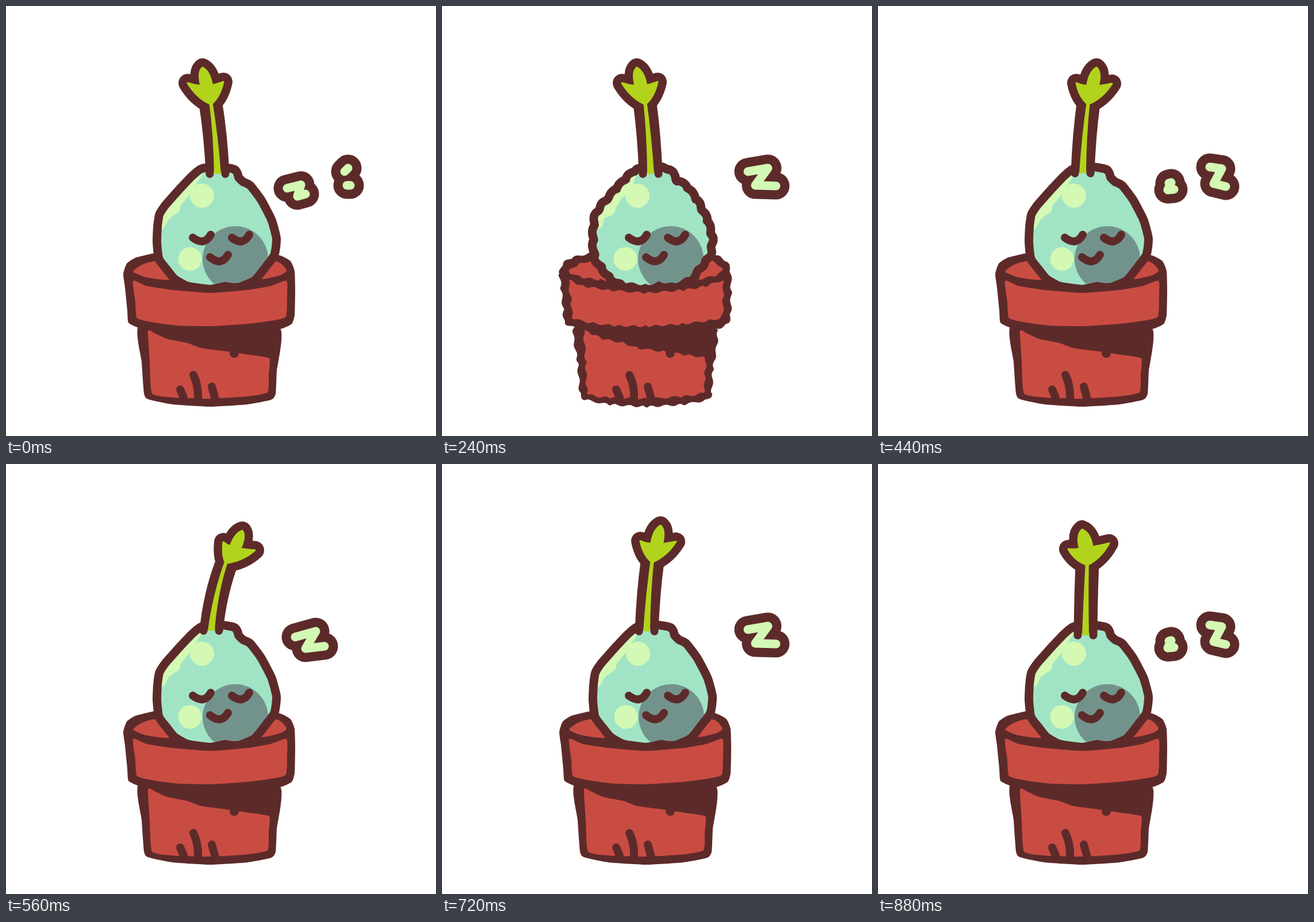
Recreate the animation shown at these times as an HTML page with a canvas. Size 748 by 748 pixels, loop 0.92 s.

```html
<!DOCTYPE html>
<html lang="en">
<head>
<meta charset="utf-8">
<title>Sleeping sprout</title>
<style>
html, body { margin: 0; width: 100%; height: 100%; overflow: hidden; background: #fff; }
canvas { display: block; width: 748px; height: 748px; }
</style>
</head>
<body>
<canvas id="stage" width="748" height="748"></canvas>
<script>
const ctx = document.getElementById('stage').getContext('2d');
const DARK = '#5d2a2a', RED = '#c94c42', TEAL = '#a1e4c5', SHADE = '#72938c',
      LIGHT = '#d3f9b4', LEAF = '#b2d31c';
const STEP = 40, COUNT = 23;

const rim = [204,466, 210,448, 225,438, 258,430, 300,424, 430,424, 477,434, 495,444, 502,461, 503,495,
  502,538, 497,553, 477,562, 420,570, 290,570, 232,560, 213,551, 211,530, 207,490];
const mouthOfPot = [221,462, 235,451, 258,444, 364,436, 470,444, 488,460, 478,468, 447,475, 360,480, 272,476, 240,471];
const band = [221,478, 245,487, 290,494, 355,499, 420,494, 460,487, 488,478, 489,505, 487,540, 465,547,
  420,553, 355,557, 300,556, 260,551, 228,543, 225,515];
const pot = [232,555, 236,620, 240,674, 247,684, 290,693, 355,697, 420,693, 461,685, 469,675, 471,635, 476,560, 355,550];
const potFront = [247,565, 258,569, 280,579, 315,586, 340,595, 385,601, 425,607, 458,613, 457,640, 455,672,
  420,679, 355,683, 290,681, 254,674, 250,620];
const body = [343,290, 328,302, 308,323, 284,350, 274,365, 271,385, 270,410, 273,437, 285,453, 298,469,
  318,480, 355,485, 380,480, 402,482, 428,471, 448,446, 460,430, 463,405, 455,375, 438,342, 420,318,
  408,312, 398,302, 394,291, 370,287];
const sheen = [345,286, 332,308, 318,330, 304,347, 302,357, 284,370, 273,388, 255,380, 270,340, 320,290];

// frame, base x, base y, neck x, neck y, then left, middle and right leaf tips from the neck
const poses = [
  [0, 368,292, 356,170, -41,-37, -14,-64, 23,-39],
  [3, 367,292, 350,174, -52,-25, -30,-59, 9,-45],
  [6, 363,292, 353,170, -41,-37, -14,-64, 23,-39],
  [8.5, 361,296, 362,175, -38,-30, 3,-63, 38,-36],
  [11, 356,291, 366,170, -22,-37, 14,-64, 42,-36],
  [14, 357,290, 384,172, -7,-37, 27,-57, 50,-23],
  [18, 356,291, 366,170, -22,-37, 14,-64, 42,-36],
  [22, 361,298, 364,175, -34,-28, -9,-62, 39,-38],
  [23, 368,292, 356,170, -41,-37, -14,-64, 23,-39]
];

const zOne = [503,301, 539,291, 521,321, 554,317];
const zTwo = [532,288, 567,282, 545,312, 581,313];
const zTop = [577,280, 598,283, 584,309, 605,314];
const lerp = (a, b, k) => a.map((v, i) => v + (b[i] - v) * k);
const snores = [
  [[489,317, 513,311, 507,331, 521,327], [589,288, 595,282], [593,312, 599,312]],
  [zOne],
  [lerp(zOne, zTwo, .5)],
  [zTwo],
  [lerp(zTwo, zTop, .5)],
  [[506,308, 510,307, 504,320, 515,319], zTop]
];

// Soft closed curve through the points; ripple waves its edge
function blob(p, ripple) {
  const path = new Path2D(), n = p.length / 2;
  const at = i => [p[(i + n) % n * 2], p[(i + n) % n * 2 + 1]];
  let run = 0;
  for (let i = 0; i < n; i++) {
    const a = at(i - 1), b = at(i), c = at(i + 1), d = at(i + 2);
    const len = Math.hypot(c[0] - b[0], c[1] - b[1]), parts = Math.ceil(len / 4);
    const nx = (c[1] - b[1]) / len, ny = (b[0] - c[0]) / len;
    for (let j = 0; j < parts; j++) {
      const t = j / parts, u = t * t, w = u * t;
      const ease = k => (2*w - 3*u + 1) * b[k] + (3*u - 2*w) * c[k]
        + .25 * ((w - 2*u + t) * (c[k] - a[k]) + (w - u) * (d[k] - b[k]));
      const s = run + t * len;
      const off = ripple * Math.sin(s / 3.6 + Math.sin(s / 37));
      path.lineTo(ease(0) + nx * off, ease(1) + ny * off);
    }
    run += len;
  }
  path.closePath();
  return path;
}

function fill(path, color) {
  ctx.fillStyle = color;
  ctx.fill(path);
}

function stroke(path, color, width, cap = 'round') {
  ctx.strokeStyle = color;
  ctx.lineWidth = width;
  ctx.lineCap = cap;
  ctx.stroke(path);
}

function dot(x, y, r, color) {
  const p = new Path2D();
  p.arc(x, y, r, 0, 7);
  fill(p, color);
}

function line(p) {
  const path = new Path2D();
  for (let i = 0; i < p.length; i += 2) path.lineTo(p[i], p[i + 1]);
  return path;
}

function drawPlant(ripple) {
  fill(blob(pot, ripple), DARK);
  fill(blob(potFront, ripple), RED);
  dot(397, 604, 8, DARK);
  for (const d of ['M326 642Q335 660 334 684', 'M358 662L364 684', 'M303 667L309 681'])
    stroke(new Path2D(d), DARK, 14);

  fill(blob(rim, ripple), DARK);
  fill(blob(mouthOfPot, ripple), RED);

  const skin = blob(body, ripple);
  stroke(skin, DARK, 30);
  fill(skin, TEAL);
  ctx.save();
  ctx.clip(skin);
  const dx = ripple ? -1 : 0;
  fill(blob(sheen, ripple), LIGHT);
  dot(341 + dx, 330, 21, LIGHT);
  dot(320 + dx, 440, 20.5, LIGHT);
  dot(399 + dx, 440, 57, SHADE);
  ctx.restore();

  for (const d of ['M325 403Q345 418 356 398', 'M393 403Q412 418 423 398', 'M355 437Q374 453 386 433'])
    stroke(new Path2D(d), DARK, 14);
  fill(blob(band, ripple), RED);
}

function poseAt(f) {
  const i = poses.findIndex(p => p[0] > f);
  const a = poses[i - 1], b = poses[i];
  return lerp(a, b, (f - a[0]) / (b[0] - a[0])).slice(1);
}

function drawSprout(f) {
  const [bx, by, nx, ny, lx, ly, mx, my, rx, ry] = poseAt(f);
  const cx = nx * .25 + bx * .75, cy = 225;
  const stem = (dx, y = by) => new Path2D(`M${nx + dx} ${ny}Q${cx + dx} ${cy} ${bx + dx} ${y}`);

  // Leaf notches sit a third of the way to the neighbouring tips
  const k = .31;
  const v = [(lx + mx) * k, (ly + my) * k], w = [(mx + rx) * k, (my + ry) * k];
  const ux = (mx - (v[0] + w[0]) / 2) * .75, uy = (my - (v[1] + w[1]) / 2) * .75;
  const head = new Path2D();
  const to = (x1, y1, x2, y2) => head.quadraticCurveTo(nx + x1, ny + y1, nx + x2, ny + y2);
  head.moveTo(nx - 2, ny);
  to(lx / 2 - 5, ly / 2 + 7, lx + 1, ly + 1);
  to((lx + v[0]) / 2, (ly + v[1]) / 2 + 2, v[0], v[1]);
  to(v[0] + ux - 1, v[1] + uy, mx, my + 1);
  to(w[0] + ux + 1, w[1] + uy, w[0], w[1]);
  to((rx + w[0]) / 2, (ry + w[1]) / 2 + 1, rx - 1, ry + 1);
  to(rx / 2 + 5, ry / 2 + 7, nx ? 2 : 0, 0);
  head.closePath();

  stroke(head, DARK, 32);
  stroke(stem(-13.5), DARK, 14);
  stroke(stem(13.5), DARK, 14);
  stroke(stem(0, by - 4), DARK, 20, 'butt');

  const green = new Path2D(
    `M${nx - 3} ${ny - 5}Q${cx - 4} ${cy} ${bx - 6} ${by}L${bx + 6} ${by}Q${cx + 4} ${cy} ${nx + 3} ${ny - 5}Z`);
  fill(green, LEAF);
  fill(head, LEAF);
  stroke(head, LEAF, 3);
}

function drawSnore(f) {
  const lines = snores[(f >> 1) % 6].map(line);
  for (const l of lines) stroke(l, DARK, 47);
  for (const l of lines) stroke(l, LIGHT, 15);
}

let shown = -1;
function tick(now) {
  const f = Math.floor(now / STEP) % COUNT;
  if (f !== shown) {
    shown = f;
    ctx.clearRect(0, 0, 748, 748);
    ctx.lineJoin = 'round';
    drawPlant(Math.floor(f / 3) % 3 === 2 ? 1.7 : 0);
    drawSprout(f);
    drawSnore(f);
  }
  requestAnimationFrame(tick);
}
const start = performance.now();
requestAnimationFrame(() => tick(0));
function tickFrom() {}
</script>
</body>
</html>
```
